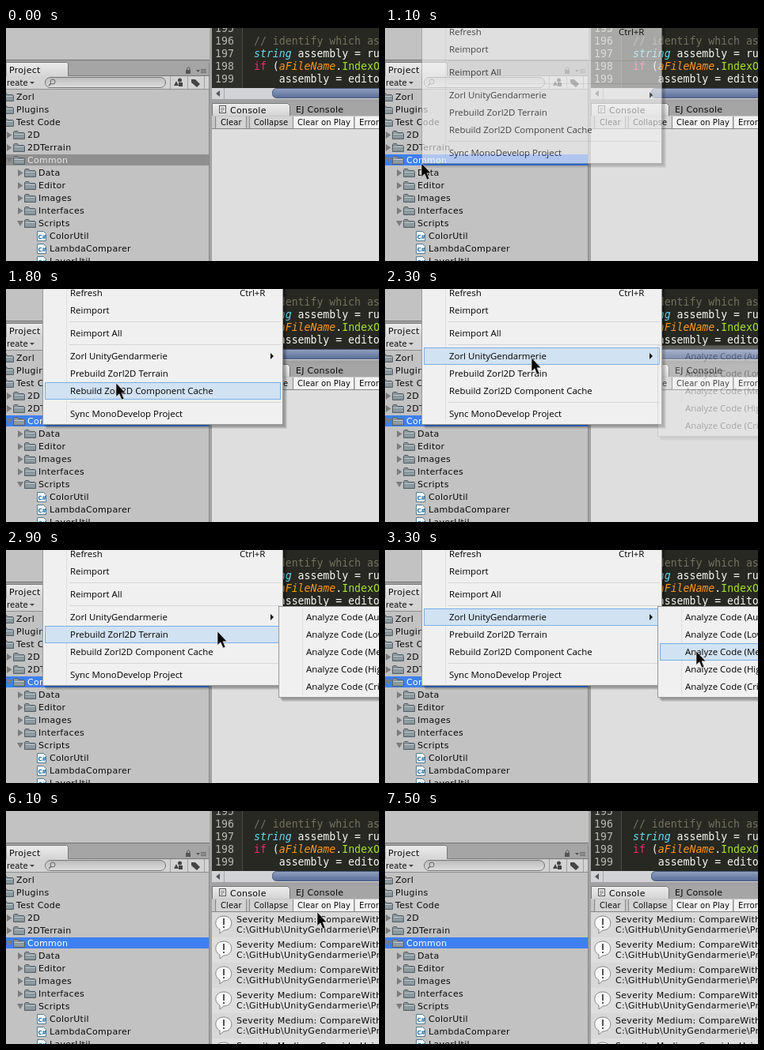
Animation, 471 px wide and 295 px high, one loop 8500 ms. Source, as an HTML page:

```html
<!DOCTYPE html>
<html lang="en">
<head>
<meta charset="utf-8">
<title>Code analysis menu</title>
<style>
  html, body { margin: 0; width: 100%; height: 100%; overflow: hidden; background: #a2a2a2; }
  svg { display: block; width: 471px; height: 295px; }
  text { white-space: pre; font: 11px "DejaVu Sans", sans-serif; letter-spacing: .3px; fill: #0a0a0a; }
  .small { font-size: 10px; letter-spacing: .1px; }
  .code { font: 13.2px "DejaVu Sans Mono", monospace; letter-spacing: 0; fill: #f8f8f2; }
  .menu { font: 11.45px "Open Sans", sans-serif; letter-spacing: 0; fill: #000; }
  .icon { font: bold 7px "DejaVu Sans", sans-serif; letter-spacing: -.5px; fill: #1c6ea8; }
</style>
</head>
<body>
<svg id="stage" viewBox="0 0 471 295"></svg>
<script>
const LOOP = 8500, STEP = 100;

// Markup helpers
const rect = (x, y, w, h, fill, more = '') =>
  `<rect x="${x}" y="${y}" width="${w}" height="${h}" fill="${fill}" ${more}/>`;
const text = (x, y, content, cls = '', more = '') =>
  `<text x="${x}" y="${y}" class="${cls}" ${more}>${content}</text>`;
const path = (d, fill, more = '') => `<path d="${d}" fill="${fill}" ${more}/>`;
const line = (d, stroke, width = 1) => path(d, 'none', `stroke="${stroke}" stroke-width="${width}"`);
const group = (id, content) => `<g id="${id}">${content}</g>`;
const span = (fill, content, italic) =>
  `<tspan fill="${fill}"${italic ? ' font-style="italic"' : ''}>${content}</tspan>`;
const gradient = (id, top, bottom) =>
  `<linearGradient id="${id}" x2="0" y2="1"><stop stop-color="${top}"/>` +
  `<stop offset="1" stop-color="${bottom}"/></linearGradient>`;

const gradients = gradient('tab', '#ececec', '#d4d4d4') + gradient('thumb', '#91a0bf', '#596d98') +
  gradient('field', '#bcbcbc', '#dedede');

// Project panel
const folder = (x, y) =>
  path(`M${x + .5} ${y + 10.5}v-9l1-1h4l1.5 2h6.5l1 1v7z`, '#86949a', 'stroke="#566066"') +
  line(`M${x + 1.5} ${y + 4.5}h12`, '#c3cbce') + line(`M${x + 1.5} ${y + 7.5}h12`, '#99a5a9');
const script = (x, y) =>
  path(`M${x + .5} ${y + .5}h8l3 3v9h-11z`, '#f4f8fa', 'stroke="#547c92"') +
  text(x + 1.5, y + 9.5, 'C#', 'icon');
const arrow = (x, y, open) =>
  path(open ? `M${x} ${y + 1}h8l-4 7z` : `M${x + 1} ${y}l6.5 4.5l-6.5 4.5z`, '#7c7c7c');

const tree = [
  ['Zorl', 0], ['Plugins', 0], ['Test Code', 0], ['2D', 1, 'shut'], ['2DTerrain', 1, 'shut'],
  ['Common', 1, 'open'], ['Data', 2, 'shut'], ['Editor', 2, 'shut'], ['Images', 2, 'shut'],
  ['Interfaces', 2, 'shut'], ['Scripts', 2, 'open'],
  ['ColorUtil', 3, 'file'], ['LambdaComparer', 3, 'file'], ['LayerUtil', 3, 'file'],
];
const treeRow = ([name, depth, kind], i) => {
  const x = 13 + depth * 14, y = 79 + i * 16;
  const icon = kind === 'file' ? script(x - 16, y + 2) : folder(x - 18, y + 3);
  const fold = kind === 'shut' || kind === 'open' ? arrow(x - 27, y + 4, kind === 'open') : '';
  return fold + icon + text(x, y + 12, name, '', name === 'Common' ? 'id="label"' : '');
};

const project =
  rect(0, 0, 257, 40, '#c2c2c2') + rect(0, 40, 257, 1, '#757575') +
  rect(0, 44, 257, 251, '#c2c2c2') + rect(78, 43, 179, 17, '#a5a5a5') +
  line('M78 60.5H257', '#777') +
  path('M0 61V43.5H76.5l2 2V61', 'url(#tab)', 'stroke="#777"') +
  text(4, 57, 'Project') +
  rect(227, 53, 6, 5, '#555') + line('M228.5 53v-2q2-3 3.5 0v2', '#555') +
  path('M240 53h5l-2.5 3z', '#555') + line('M246 52.5h7M246 54.5h7M246 56.5h7', '#666') +
  rect(0, 61, 257, 16, '#d3d3d3') + rect(0, 77, 257, 1, '#8d8d8d') +
  text(1, 73, 'reate', 'small') + path('M30 68h6l-3 3z', '#444') +
  rect(49.5, 62.5, 152, 13, 'url(#field)', 'rx="6.5" stroke="#757575"') +
  '<circle cx="59" cy="68" r="3" fill="none" stroke="#666"/>' + line('M57 70l-3 3', '#666', 1.5) +
  line('M207.5 61v16M229.5 61v16M250.5 61v16', '#a0a0a0') +
  path('M212 73l3-6l3 6z', '#444') + rect(218, 69, 5, 5, '#444') +
  '<circle cx="219.5" cy="66" r="2.5" fill="#444"/>' +
  path('M234 65h5l6 6l-4 4l-7-6z', '#444') +
  rect(0, 160, 257, 14, '#8f8f8f', 'id="selection"') +
  tree.map(treeRow).join('') +
  rect(256, 44, 1, 251, '#8a8a8a');

// Code editor
const codeLine = (n, content) => {
  const y = 5 + (n - 195) * 16;
  return text(264, y, span('#b8b8b0', n), 'code') + text(313, y, content, 'code');
};
const editor =
  rect(260, 0, 211, 76, '#272822') + rect(260, 0, 38, 76, '#2e2f2a') + rect(298, 0, 1, 76, '#4a4b45') +
  codeLine(195, '') +
  codeLine(196, span('#75715e', '// identify which assembly')) +
  codeLine(197, span('#66d9ef', 'string', true) + ' assembly = runtime') +
  codeLine(198, span('#f92672', 'if') + ' (' + span('#fd971f', 'aFileName', true) + '.' +
    span('#a6e22e', 'IndexOf')) +
  codeLine(199, '    assembly = editor') +
  rect(260, 76, 211, 14, '#d2d3d6') +
  path('M270 79v8l-5-4z', '#555') + line('M275.5 76v14', '#a5a5a9') +
  rect(336.5, 76.5, 150, 12, 'url(#thumb)', 'rx="5" stroke="#4b5a7c"');

// Console panel
const button = (x, w, label, fill) =>
  rect(x, 112, w, 15, fill) + rect(x + w, 112, 1, 15, '#888') + text(x + 5, 123, label, 'small');
const message = i => {
  const y = 128 + i * 32, rule = i < 5 ? 'CompareWithEmpty' : 'ConsiderUsing';
  return rect(260, y, 211, 32, i % 2 ? '#dedede' : '#d8d8d8') +
    path(`M270 ${y + 22}c-8-4-7-17 5-17c13 0 13 18 0 18l-5 4z`, '#f8f8f8', 'stroke="#858585"') +
    rect(274, y + 8, 2, 8, '#555') + rect(274, y + 18, 2, 2, '#555') +
    text(291, y + 13, 'Severity Medium: ' + rule) +
    text(291, y + 26, 'C:\\GitHub\\UnityGendarmerie\\Project');
};
const consolePanel =
  rect(260, 90, 211, 5, '#a2a2a2') + rect(260, 95, 211, 16, '#a5a5a5') +
  path('M260.5 111V95.5H356l2.5 3V111', 'url(#tab)', 'stroke="#777"') +
  rect(269.5, 98.5, 8, 9, '#eee', 'stroke="#555"') + line('M271 101.5h5M271 103.5h5M271 105.5h3', '#777') +
  text(283, 108, 'Console') + text(366, 107, 'EJ Console') +
  rect(260, 111, 211, 17, '#c6c6c6') + rect(264, 112, 1, 15, '#888') +
  button(266, 37, 'Clear', '#d3d3d3') + rect(307, 112, 1, 15, '#888') +
  button(308, 54, 'Collapse', '#d3d3d3') +
  button(363, 76, 'Clear on Play', '#f3f3f3') + button(441, 70, 'Error Pause', '#f3f3f3') +
  rect(260, 127, 211, 1, '#858585') + rect(260, 128, 211, 167, '#dedede') +
  group('messages', [0, 1, 2, 3, 4, 5].map(message).join(''));

// Context menus
const ROW = 22;
const mainItems = [
  ['Refresh', -6], ['Reimport', 16], ['Reimport All', 45], ['Zorl UnityGendarmerie', 74],
  ['Prebuild Zorl2D Terrain', 96], ['Rebuild Zorl2D Component Cache', 118],
  ['Sync MonoDevelop Project', 147],
];
const PARENT = 74, PICK = 118;
const subItems = ['Audit', 'Low', 'Medium', 'High', 'Critical']
  .map((level, i) => [`Analyze Code (${level})`, 74 + i * ROW]);

const highlight = (id, x, w, y = 0) =>
  rect(x + .5, y + .5, w - 1, ROW - 1, '#d1e2f2', `id="${id}" stroke="#78aee5"`);
const panel = (x, y, w, h) =>
  [5, 4, 3, 2].map(d => rect(x + d, y + d, w, h, '#000', 'opacity=".09"')).join('') +
  rect(x + .5, y + .5, w - 1, h - 1, '#f0f0f0', 'stroke="#979797"') +
  line(`M${x + 30.5} ${y + 3}v${h - 6}`, '#e0e0e0');
const labels = (items, x) => items.map(([name, y]) => text(x, y + 15, name, 'menu')).join('');

const menus =
  group('mainMenu', panel(46, -20, 304, 192) +
    line('M80 41.5H347M80 70.5H347M80 143.5H347', '#d7d7d7') +
    highlight('mainMark', 49, 298) + labels(mainItems, 81) +
    text(295, 9, 'Ctrl+R', 'menu') + path('M334 81l4 4l-4 4z', '#111')) +
  group('subMenu', panel(344, 71, 160, 116) + highlight('subMark', 347, 154) + labels(subItems, 379)) +
  group('picked', highlight('pickedMark', 347, 154, PICK) + labels([subItems[2]], 379));

const pointer = group('pointer',
  path('M0 0V17.5L4 13.8L7 21L10 20L7 12.8H12Z', '#0b0808', 'stroke="#efe9e9" stroke-width=".6"'));

document.getElementById('stage').innerHTML =
  gradients + project + editor + consolePanel + menus + pointer;
const parts = Object.fromEntries(['selection', 'label', 'messages', 'mainMenu', 'mainMark', 'subMenu',
  'subMark', 'picked', 'pointer'].map(id => [id, document.getElementById(id)]));

// Pointer moves: start, end, from, to, easing
const easeOut = u => 1 - (1 - u) ** 1.5;
const smooth = u => u * u * (3 - 2 * u);
const moves = [
  [100, 700, [447, 35], [46, 171], smooth],
  [1400, 1600, [46, 171], [85, 155], u => u ** 1.5],
  [1600, 2100, [85, 155], [185, 87], easeOut],
  [2600, 3300, [185, 87], [393, 128], smooth],
  [7000, 7400, [393, 128], [442, 62], u => u ** 1.3],
];
function pointerAt(t) {
  const [start, end, from, to, ease] = moves.findLast(m => t >= m[0]) || moves[0];
  const p = ease(Math.min(1, Math.max(0, (t - start) / (end - start))));
  return from.map((v, i) => Math.round(v + (to[i] - v) * p));
}

const show = (node, opacity) => {
  node.style.display = opacity > 0 ? '' : 'none';
  node.style.opacity = opacity;
};
const fadeIn = (t, start) => t < start ? 0 : Math.min(1, .25 + (t - start) / 260);
function mark(node, top) {
  show(node, top === undefined ? 0 : 1);
  if (top !== undefined) node.setAttribute('y', top + .5);
}
const hit = (items, y) => items.find(([, top]) => y >= top && y < top + ROW)?.[1];

function render(t) {
  const [x, y] = pointerAt(t), menusOpen = t < 3800;
  const inSub = t >= 2300 && x >= 347;
  parts.selection.setAttribute('fill', t >= 1000 ? '#3e80ef' : '#8f8f8f');
  parts.label.style.fill = t >= 1000 ? '#fff' : '#e6e6e6';
  show(parts.messages, t >= 6100 ? 1 : 0);
  show(parts.mainMenu, menusOpen ? fadeIn(t, 1000) : 0);
  show(parts.subMenu, menusOpen ? fadeIn(t, 2300) : 0);
  show(parts.picked, menusOpen ? 0 : Math.max(0, (4000 - t) / 280));
  mark(parts.mainMark, inSub ? PARENT : x > 48 ? hit(mainItems, y) : undefined);
  mark(parts.subMark, inSub ? hit(subItems, y) : undefined);
  show(parts.pointer, t >= 100 && t < 7500 ? 1 : 0);
  parts.pointer.setAttribute('transform', `translate(${x} ${y})`);
}

const begin = performance.now();
function tick() {
  const t = (performance.now() - begin) % LOOP;
  render(Math.floor(t / STEP) * STEP);
  requestAnimationFrame(tick);
}
tick();
</script>
</body>
</html>
```
